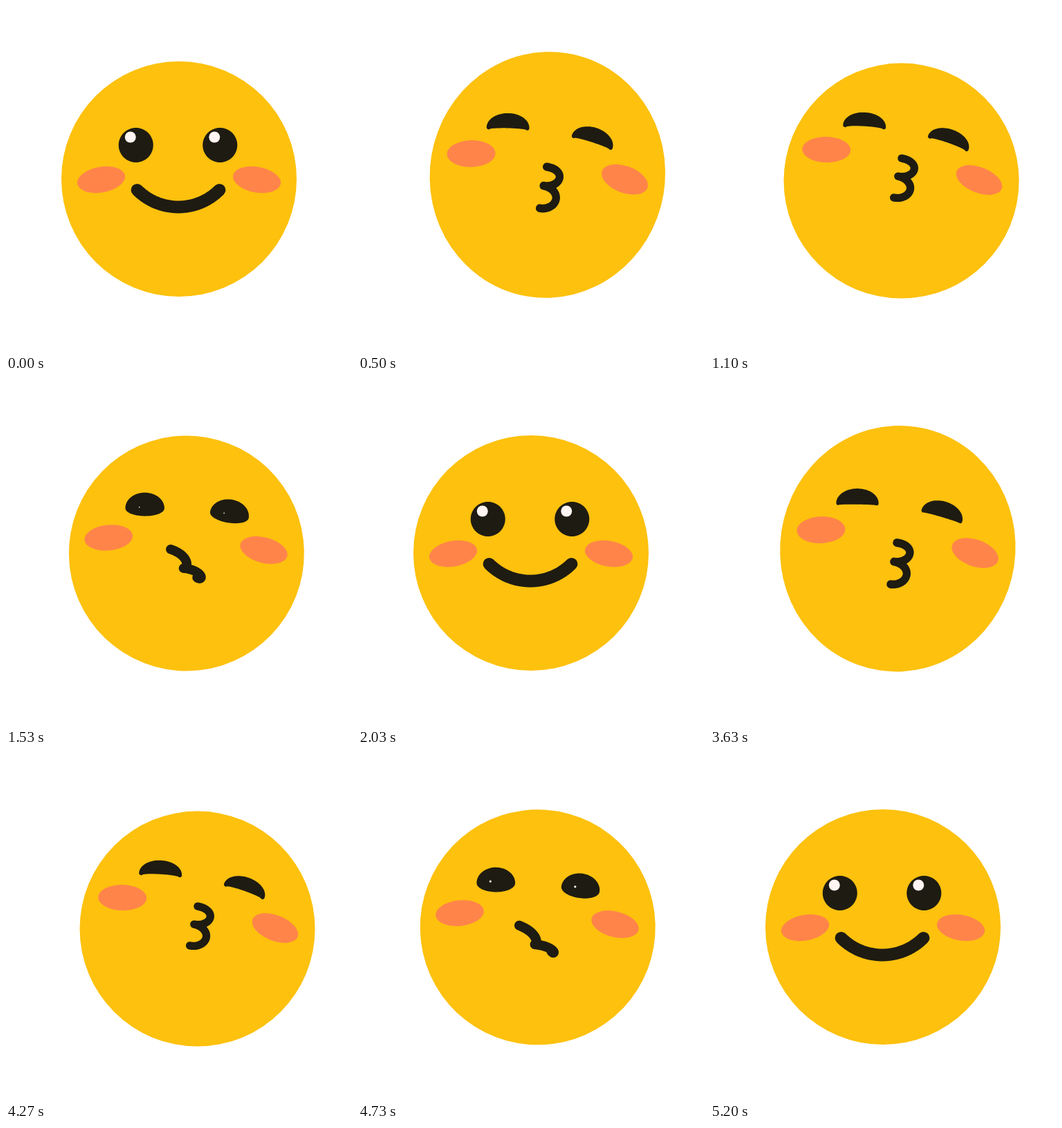
An HTML page with a canvas for the animation above (6310 ms loop, 500 by 500 pixels).

```html
<!DOCTYPE html>
<html lang="en">
<head>
<meta charset="utf-8">
<title>Kissing face</title>
<style>
html, body { margin: 0; width: 100%; height: 100%; overflow: hidden; background: #fff; }
canvas { display: block; }
</style>
</head>
<body>
<canvas id="stage" width="500" height="500"></canvas>
<script>
const LOOP = 6310, SECOND_KISS = 3170;
const FACE = '#fdc10e', DARK = '#1e1b12', BLUSH = '#ff844a', SHINE = '#fff5f2';
const ctx = document.getElementById('stage').getContext('2d');

const rad = degrees => degrees * Math.PI / 180;
const mix = (a, b, k) => a + (b - a) * k;
const ease = (t, a, b) => 0.5 - 0.5 * Math.cos(Math.PI * Math.min(1, Math.max(0, (t - a) / (b - a))));
// Rises from a to b, holds, falls from c to d.
const swell = (t, a, b, c, d) => ease(t, a, b) - ease(t, c, d);

// Builds a path through point(s) for s from 0 to 1.
function trace(point, steps = 80) {
  ctx.beginPath();
  for (let i = 0; i <= steps; i++) ctx.lineTo(...point(i / steps));
}

function oval(x, y, rx, ry, degrees, color) {
  ctx.beginPath();
  ctx.ellipse(x, y, rx, ry, rad(degrees), 0, 2 * Math.PI);
  ctx.fillStyle = color;
  ctx.fill();
}

// A disc whose lower half folds up into a crescent.
function drawEye(side, shut, lift) {
  const width = mix(25, 28, shut), top = mix(25, 17, shut), bottom = mix(25, -3, shut);
  ctx.save();
  ctx.translate(248.5 + side * (60.75 + shut) - 4.5 * shut, 201 + 7 * shut - 25 * lift);
  ctx.rotate(rad(side * 8 * shut));
  trace(s => {
    const y = Math.sin(2 * Math.PI * s);
    return [width * Math.cos(2 * Math.PI * s), y * (y < 0 ? top : bottom)];
  });
  ctx.closePath();
  ctx.fillStyle = DARK;
  ctx.fill();
  if (shut > 0) {
    ctx.lineWidth = 6 * shut;
    ctx.stroke();
  }
  const shine = Math.max(0, 1 - shut / 0.6);
  oval(-8, -11.5 * shine, 8 * shine, 8 * shine, 0, SHINE);
  ctx.restore();
}

function smile(s) {
  const a = rad(mix(135, 45, s));
  return [249 + 84 * Math.cos(a), 206.5 + 84 * Math.sin(a)];
}

// Two half ellipses, one above the other, the lower one a little taller.
function kiss(s) {
  const lower = s > 0.5 ? 1 : 0;
  const a = Math.PI * (2 * s - lower);
  const down = (lower + (1 - Math.cos(a)) / 2) / 2;
  return [244 + 21 * Math.sin(a), 218 + 58 * down ** 1.13];
}

function drawMouth(pucker, lift) {
  const low = pucker * (1 - lift);
  trace(s => {
    const [x1, y1] = smile(s), [x2, y2] = kiss(s);
    return [mix(x1, x2, pucker) + 6 * low, mix(y1, y2, pucker) + 44 * low];
  });
  ctx.lineWidth = mix(18, 11.3, pucker);
  ctx.stroke();
}

function draw(t) {
  const tilt = 13.3 * swell(t, 0, 780, 780, 2030);
  const stretch = 1 + 0.047 * swell(t, 0, 500, 500, 1000);
  const lift = swell(t, 0, 980, 1150, 2030);
  const shut = swell(t, 0, 550, 1150, 1950);
  const pucker = swell(t, 0, 430, 1250, 1950);

  ctx.fillStyle = '#fff';
  ctx.fillRect(0, 0, 500, 500);
  ctx.save();
  // Lean around the chin, stretch up from the bottom edge.
  ctx.translate(250, 386);
  ctx.rotate(rad(tilt));
  ctx.translate(-250, 34);
  ctx.scale(1, stretch);
  ctx.translate(0, -420);
  ctx.strokeStyle = DARK;
  ctx.lineCap = ctx.lineJoin = 'round';

  oval(250, 250, 170, 170, 0, FACE);
  for (const side of [-1, 1]) {
    oval(250 + side * 112.5 - 2.5 * lift, 251 - 24 * lift, 35, 18.5, side * 10, BLUSH);
    drawEye(side, shut, lift);
  }
  drawMouth(pucker, lift);
  ctx.restore();
}

function tick() {
  const t = performance.now() % LOOP;
  draw(t < SECOND_KISS ? t : t - SECOND_KISS);
  requestAnimationFrame(tick);
}
tick();
</script>
</body>
</html>
```
